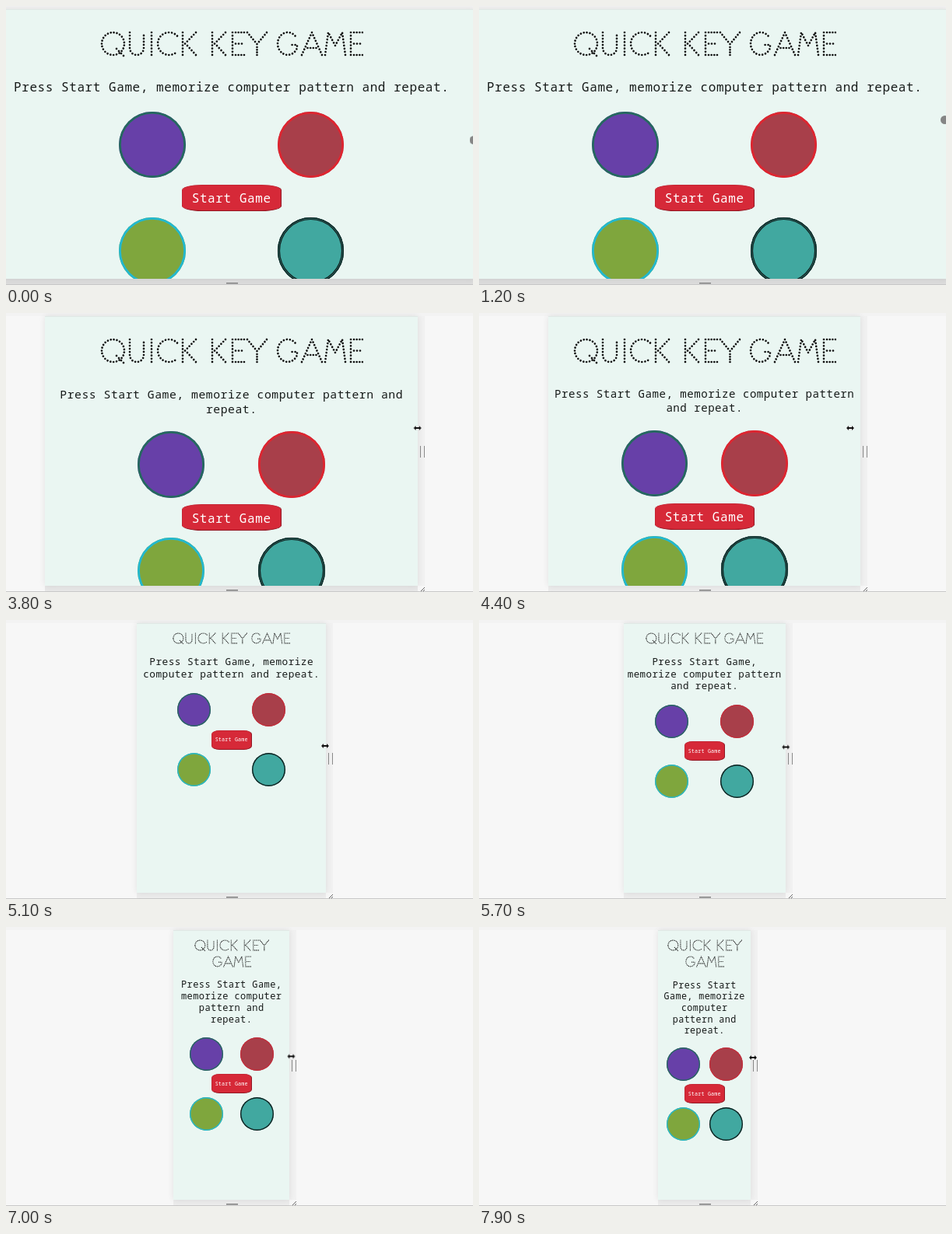
Recreate the animation shown at these times as an HTML page. Size 600x359 px, loop 8000 ms.

```html
<!DOCTYPE html>
<html lang="en">
<head>
<meta charset="utf-8">
<title>Quick Key Game</title>
<style>
@property --w { syntax: "<length>"; inherits: true; initial-value: 626px; }

html, body { margin: 0; width: 100%; height: 100%; overflow: hidden; background: #f7f7f7; }
* { box-sizing: border-box; }

.stage { position: relative; width: 600px; height: 359px; overflow: hidden; background: #f7f7f7; }
.stage::before { content: ""; position: absolute; inset: 0 0 auto; height: 4px; background: #f3f3f3; }
.stage::after { content: ""; position: absolute; inset: auto 0 0; height: 1px; background: #c8c8c8; }

/* Resizable viewport */
.frame {
  position: absolute; top: 4px; left: calc(289.7px - var(--w) / 2);
  width: var(--w); height: 355px;
  animation: resize 8s -5ms infinite;
}
.page {
  position: absolute; inset: 0 0 8px; overflow: hidden;
  container-type: inline-size;
  background: #eaf6f2; box-shadow: 0 0 8px rgba(0, 0, 0, .09), inset 0 1px #e0e8e5;
}
.side { position: absolute; left: 100%; top: 0; width: 9px; height: 347px; background: #f1f1f1; }
.side::before {
  content: ""; position: absolute; left: 3px; top: 167px; width: 4px; height: 15px;
  border: solid #8a8a8a; border-width: 0 1px;
}
.foot {
  position: absolute; left: 0; bottom: 0; width: 100%; height: 8px;
  background: #dcdcdc; animation: foot 8s -5ms infinite;
}
.foot::before {
  content: ""; position: absolute; left: calc(50% - 7px); top: 5px; width: 15px; height: 3px;
  border: solid #777; border-width: 1px 0; background: #bbb;
}
.corner { position: absolute; left: calc(100% + 2px); bottom: 0; width: 7px; height: 7px; }
.corner path { stroke: #666; fill: none; }

/* Page content */
.content {
  --a: calc(6.81px + .537cqw);
  --d: 85.5px; --line: 2.8px; --scale: 1;
  --gap: calc((100cqw - 271px) / 3);
  --top: 21px; --under: 23.2px; --over: 21.4px; --space: 8.5px;
  padding: var(--top) 4.2px 0;
  font-family: "Noto Sans Mono", "DejaVu Sans Mono", monospace;
  font-weight: 500; color: #161a19;
}
h1 {
  display: flex; flex-wrap: wrap; justify-content: center;
  column-gap: calc(10px * var(--scale)); margin: 0 0 var(--under);
}
h1 svg { flex: none; height: calc(46px * var(--scale)); fill: none; stroke: #111; stroke-width: 2.7; stroke-linecap: round; }
.wide { width: calc(216px * var(--scale)); }
.slim { width: calc(112px * var(--scale)); }
p {
  position: relative; top: 1px;
  margin: 0 0 var(--over); text-align: center;
  font-size: calc(var(--a) * 1.575); letter-spacing: calc(var(--a) * .055);
  line-height: calc(var(--a) * 1.958);
}
.row { display: flex; justify-content: center; gap: var(--gap); }
.row i {
  flex: none; width: var(--d); height: var(--d); border-radius: 50%;
  box-shadow: inset 0 0 0 var(--line) var(--rim);
}
.purple { background: #6740a8; --rim: #25695f; }
.red { background: #a83f4a; --rim: #de2530; }
.green { background: #7fa63d; --rim: #22b8d0; }
.teal { background: #41a8a0; --rim: #10201f; }
.row .teal { box-shadow: inset 0 0 0 1.3px var(--rim), inset 0 0 0 1.9px #337f79, inset 0 0 0 3.1px var(--rim); }
.start {
  display: block; width: 128px; height: 34px; margin: var(--space) auto; padding: 1px 0 0;
  font: 500 16px/1 "Noto Sans Mono", "DejaVu Sans Mono", monospace; letter-spacing: .6px;
  color: #fff; background: #d62938; border: 1px solid; border-radius: 20%;
  border-color: #c42533 #931623 #931623 #c42533;
}

@container (max-width: 345px) {
  .content {
    --d: 43px; --line: 1.4px; --scale: .446;
    --gap: calc((100cqw - 83px) / 3);
    --top: 9px; --under: 11.8px; --over: calc(var(--a) * 1.667 + 3.7px); --space: 4.5px;
  }
  .row .teal { box-shadow: inset 0 0 0 var(--line) var(--rim); }
  .row .red { --rim: #c02f3c; }
  .start { width: 52px; height: 25px; font-size: 6.7px; letter-spacing: .2px; }
}

/* Pointers */
.dot, .arrows { position: absolute; left: 0; top: 0; }
.dot {
  width: 11px; height: 11px; margin: -5.5px; border-radius: 50%; background: #858585;
  animation: dot 8s -5ms infinite;
}
.arrows { width: 10px; height: 8px; margin: -4px -5px; overflow: visible; animation: drag 8s -5ms infinite; }
.arrows path { fill: #111; stroke: #fff; stroke-width: 1; paint-order: stroke; }

@keyframes resize {
  0%, 40% { --w: 626px; animation-timing-function: steps(9); }
  51.25% { --w: 406px; animation-timing-function: steps(3); }
  55% { --w: 401px; animation-timing-function: steps(6); }
  62.5% { --w: 260px; animation-timing-function: steps(1); }
  63.75% { --w: 243px; animation-timing-function: steps(8); }
  73.75% { --w: 196px; animation-timing-function: steps(3); }
  77.5% { --w: 175px; animation-timing-function: steps(6); }
  85% { --w: 156px; animation-timing-function: steps(5); }
  91.25%, 93.75% { --w: 140px; animation-timing-function: steps(4); }
  98.75%, 100% { --w: 119px; }
}
@keyframes foot {
  0%, 40% { background: #dcdcdc; animation-timing-function: steps(9); }
  51.25%, 100% { background: #ececec; }
}
@keyframes dot {
  0%, 6.25% { transform: translate(600.5px, 172px); animation-timing-function: steps(7); }
  15% { transform: translate(598px, 146px); animation-timing-function: steps(2); }
  17.5% { transform: translate(598px, 144px); animation-timing-function: steps(6); }
  25%, 100% { transform: translate(608px, 148px); }
}
@keyframes drag {
  0%, 40% { transform: translate(608px, 148px); animation-timing-function: steps(9); }
  51.25% { transform: translate(489px, 148px); animation-timing-function: steps(3); }
  55% { transform: translate(477px, 148px); animation-timing-function: steps(6); }
  62.5% { transform: translate(420px, 160px); animation-timing-function: steps(1); }
  63.75% { transform: translate(410px, 162px); animation-timing-function: steps(8); }
  73.75% { transform: translate(389px, 164px); animation-timing-function: steps(3); }
  77.5% { transform: translate(381px, 165px); animation-timing-function: steps(6); }
  85% { transform: translate(370px, 166px); animation-timing-function: steps(5); }
  91.25%, 93.75% { transform: translate(361px, 167px); animation-timing-function: steps(4); }
  98.75%, 100% { transform: translate(352px, 168px); }
}
</style>
</head>
<body>
<div class="stage">
  <div class="frame">
    <div class="side"></div>
    <div class="foot"></div>
    <svg class="corner" viewBox="0 0 7 7"><path d="M1 7L7 1M4 7L7 4"/></svg>
    <div class="page">
      <div class="content">
        <h1 aria-label="QUICK KEY GAME">
          <svg class="wide" viewBox="-2 -9 216 46" data-text="QUICK KEY" data-x="0 36 64 73 104 0 142 168 187"></svg>
          <svg class="slim" viewBox="-2 -9 112 46" data-text="GAME" data-x="0 31 61 94"></svg>
        </h1>
        <p>Press Start Game, memorize computer pattern and repeat.</p>
        <div class="row"><i class="purple"></i><i class="red"></i></div>
        <button class="start">Start Game</button>
        <div class="row"><i class="green"></i><i class="teal"></i></div>
      </div>
    </div>
  </div>
  <div class="dot"></div>
  <svg class="arrows" viewBox="0 0 10 8"><path d="M0 4L3 1V3H7V1L10 4L7 7V5H3V7Z"/></svg>
</div>
<script>
// Letter skeletons, drawn as evenly dotted strokes
const glyphs = {
  Q: ["M0 14.5a14.5 14.5 0 1 1 29 0a14.5 14.5 0 1 1-29 0", "M19 21L28 30"],
  U: ["M0 0V20a9 9 0 0 0 18 0V0"],
  I: ["M0 0V29"],
  C: ["M24 4.5A14.5 14.5 0 1 0 24 24.5"],
  K: ["M0 0V29", "M17 0L3 14.5", "M6 17L17 29"],
  E: ["M0 0V29", "M4 0H15", "M4 14.5H12", "M4 29H15"],
  Y: ["M0 0L12.5 15L25 0", "M12.5 19V29"],
  G: ["M22.5 4.5A13 14.5 0 1 0 25 20V16H15"],
  A: ["M0 29L13 0L26 29", "M7.5 20H18.5"],
  M: ["M0 29L4 0L13 17L22 0L26 29"]
};

function drawWord(svg) {
  const xs = svg.dataset.x.split(" ");
  [...svg.dataset.text].forEach((ch, i) => {
    for (const d of glyphs[ch] || []) {
      const path = document.createElementNS("http://www.w3.org/2000/svg", "path");
      path.setAttribute("d", d);
      path.setAttribute("transform", `translate(${xs[i]})`);
      svg.append(path);
      const len = path.getTotalLength();
      const step = len / Math.round(len / 4);
      path.setAttribute("stroke-dasharray", `0.01 ${step * 0.998 - 0.01}`);
    }
  });
}

document.querySelectorAll("h1 svg").forEach(drawWord);
</script>
</body>
</html>
```
